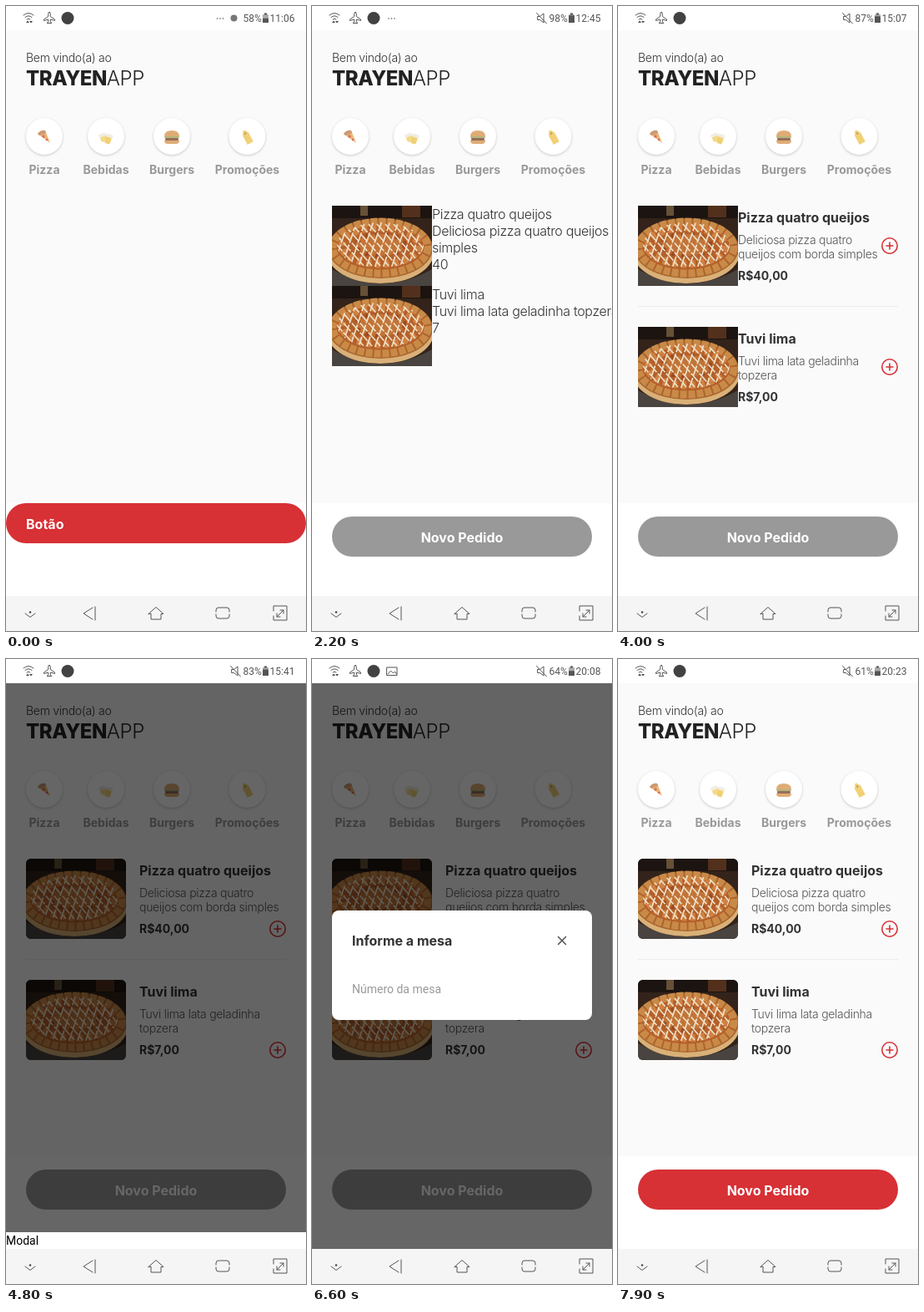
These frames come from a looping animation (360 by 748 pixels, 8000 ms). An HTML page:

```html
<!DOCTYPE html>
<html lang="pt-BR">
<head>
<meta charset="utf-8">
<title>Pedidos</title>
<style>
  html, body { margin: 0; width: 100%; height: 100%; overflow: hidden; background: #fff }
  svg { display: block; width: 100vw; height: 100vh }
  text { font-family: Inter, sans-serif; letter-spacing: -.02em; white-space: pre }
  text[font-weight="700"] { letter-spacing: 0 }
  .sys { font-family: Roboto, sans-serif; letter-spacing: 0 }
  .line { fill: none; stroke: #555; stroke-width: 1; stroke-linecap: round; stroke-linejoin: round }
  .disc { fill: #fff; filter: drop-shadow(0 1px 1.5px #0003) }
</style>
</head>
<body>
<svg id="stage" viewBox="0 0 360 748" preserveAspectRatio="none"></svg>
<script>
const LOOP = 8000, RED = '#d73035', GREY = '#999', INK = '#333';
const stage = document.getElementById('stage');

const rect = (x, y, w, h, fill, more = '') =>
  `<rect x="${x}" y="${y}" width="${w}" height="${h}" fill="${fill}" ${more}/>`;
const circle = (x, y, r, more) => `<circle cx="${x}" cy="${y}" r="${r}" ${more}/>`;
const line = (d, more = '') => `<path class="line" d="${d}" ${more}/>`;
const shape = (d, fill) => `<path d="${d}" fill="${fill}"/>`;
const text = (x, y, str, size = 14, weight = 300, fill = INK, more = '') =>
  `<text x="${x}" y="${y}" font-size="${size}" font-weight="${weight}" fill="${fill}" ${more}>${str}</text>`;
const sys = (x, y, str, size, fill) => text(x, y, str, size, 400, fill, 'class="sys"');
const MIDDLE = 'text-anchor="middle"';

// Each entry changes the screen from its time on.
const steps = [
  [0, { button: [0, 595, 360, 'Botão'], fill: RED, extra: '', mute: false, list: '', overlay: 0 }],
  [100, { centered: true }], [200, { footer: true, button: [0, 611, 360, 'Botão'] }],
  [300, { button: [24, 611, 312, 'Botão'] }], [500, { button: [24, 611, 312, 'Novo Pedido'] }], [600],
  [1000, { fill: GREY }], [1200, { list: 'names', left: 24, pitch: 20 }], [1300], [1500],
  [1600, { list: 'raw', pitch: 80 }], [1800, { mute: true }],
  [2000, { photo: true, left: 144, pitch: 96 }],
  [2100, { extra: 'dots' }], [2200], [2300], [2400], [2500, { list: 'styled' }], [2600],
  [2700, { pitch: 120 }], [2800, { extra: '' }], [2900], [3000, { pitch: 145 }],
  [3200], [3300, { rule: true }], [3400], [3500, { plus: 48 }], [3600], [3700], [3800], [4000],
  [4200, { rounded: true }], [4300, { left: 160 }], [4400, { plus: 84 }],
  [4600, { overlay: 657, modal: 'sheet' }], [4800],
  [5000, { overlay: 677, modal: 'text', height: 68 }], [5200], [5300],
  [5400, { modal: 'title', height: 74 }], [5600], [5800, { close: true }], [6000],
  [6200, { modal: 'field', height: 108 }], [6400, { extra: 'picture' }],
  [6600, { height: 131 }], [6800], [7000, { height: 155, border: true }],
  [7200, { height: 220, save: GREY }], [7400, { save: RED }], [7600],
  [7800, { overlay: 0, modal: '', fill: RED, extra: '' }], [7900],
];

// time, minute of the day, battery percentage
const gauges = [[0, 666, 58], [1000, 682, 56], [2200, 765, 98], [4000, 907, 87],
  [4800, 941, 83], [6600, 1208, 64], [7900, 1223, 61]];

function gauge(t, col) {
  const i = Math.max(1, gauges.findIndex(g => g[0] >= t));
  const a = gauges[i - 1], b = gauges[i];
  return Math.floor(a[col] + (b[col] - a[col]) * (t - a[0]) / (b[0] - a[0]) + 1e-6);
}

const products = [
  { name: 'Pizza quatro queijos', raw: ['Deliciosa pizza quatro queijos com borda', 'simples', '40'],
    info: ['Deliciosa pizza quatro', 'queijos com borda simples'], price: 'R$40,00' },
  { name: 'Tuvi lima', raw: ['Tuvi lima lata geladinha topzera', '7'],
    info: ['Tuvi lima lata geladinha', 'topzera'], price: 'R$7,00' },
];

function pizzaPhoto() {
  let sauce = '';
  for (let i = -2; i < 14; i++) sauce += `M${i * 10} 18l-22 66M${i * 10 - 16} 22l44 50`;
  const ellipse = (y, rx, ry, more) => `<ellipse cx="58" cy="${y}" rx="${rx}" ry="${ry}" ${more}/>`;
  return rect(0, 0, 120, 96, '#33231a') + rect(0, 0, 120, 15, '#1c1410') +
    rect(34, 0, 9, 12, '#665038') + rect(84, 0, 22, 14, '#53301c') +
    shape('M0 76q60 34 120 0v20H0z', '#4a4440') +
    ellipse(56, 64, 37, 'fill="#d9b078"') + ellipse(51, 63, 36, 'fill="#a9662e"') +
    ellipse(50, 57, 31, 'fill="#b4602a" stroke="#c98a48" stroke-width="9" stroke-dasharray="8 2"') +
    ellipse(48, 46, 22, 'fill="none" stroke="#cf8142" stroke-width="9" stroke-dasharray="6 5"') +
    ellipse(47, 29, 13, 'fill="#c27438" stroke="#9c4a22" stroke-width="5" stroke-dasharray="4 8"') +
    `<path clip-path="url(#topping)" d="${sauce}" fill="none" stroke="#efe0c6" stroke-width="1.7" stroke-dasharray="13 2"/>`;
}

const defs = `<defs>
  <clipPath id="topping"><ellipse cx="58" cy="47" rx="52" ry="27"/></clipPath>
  <clipPath id="square">${rect(0, 0, 120, 96, '#000')}</clipPath>
  <clipPath id="rounded">${rect(0, 0, 120, 96, '#000', 'rx="6"')}</clipPath>
  <g id="photo">${pizzaPhoto()}</g></defs>`;

const icons = [
  shape('M-8-4q4-5 9-4L7 7Z', '#e8b06a') + shape('M-8-4q4-5 9-4l1 3-8 3z', '#c98d62') +
    circle(-1, -1, 1.7, 'fill="#d4604a"') + circle(3, 3, 1.3, 'fill="#d4604a"'),
  '<g transform="rotate(-20)">' + rect(-7, -4, 8, 8, '#f3d57a', 'rx="2"') + rect(-8, -6, 9, 4, '#f1ece2', 'rx="2"') +
    '</g><g transform="rotate(20)">' + rect(0, -2, 7, 9, '#f0cd68', 'rx="2"') + rect(-1, -5, 9, 4, '#f1ece2', 'rx="2"') + '</g>',
  shape('M-9-1q0-7 9-7t9 7z', '#dca468') + rect(-9, -1, 18, 2, '#a9b070', 'rx="1"') +
    rect(-8, 1, 16, 3, '#8f5f48', 'rx="1"') + shape('M-9 4H9q0 4-4 4H-5q-4 0-4-4z', '#dca468'),
  '<g transform="rotate(-28)">' + shape('M-4-4L-1-9h2l3 5V8h-8z', '#f0cc68') + circle(0, -5, 1.2, 'fill="#b99050"') + '</g>',
];
const categories = [['Pizza', 46], ['Bebidas', 120], ['Burgers', 199], ['Promoções', 289.5]];

const header = text(24, 67, 'Bem vindo(a) ao') +
  text(24, 95, 'TRAYEN<tspan font-weight="300">APP</tspan>', 24, 800, '#222') +
  categories.map(([label, x], i) => circle(x, 156, 22, 'class="disc"') +
    `<g transform="translate(${x} 157)" opacity=".9">${icons[i]}</g>` +
    text(x, 200.5, label, 14, 700, GREY, MIDDLE)).join('');

const navBar = rect(0, 706, 360, 42, '#f5f5f5') +
  line('M23 727l6 4.5 6-4.5') + circle(29, 725.5, 1.3, 'fill="#484848"') +
  line('M107 719v16M104 720 93 727l11 7') +
  line('M171 727.5l9-8 9 8h-3v6.5h-12v-6.5z') +
  line('M252 725v-2q0-3 3-3h10q3 0 3 3v2M252 728v2q0 3 3 3h10q3 0 3-3v-2') +
  line('M321 724v-6h16v17h-16v-5M325 731l8-8m-4 0h4v4M325 727v4h4');

const dots = x => [-3.5, 0, 3.5].map(d => circle(x + d, 15, .8, 'fill="#555"')).join('');

function statusBar(s, t) {
  const now = gauge(t, 1), level = gauge(t, 2);
  const clock = Math.floor(now / 60) + ':' + String(now % 60).padStart(2, '0');
  const fill = 9 * level / 100;
  return rect(0, 0, 360, 29, '#fff') +
    line('M21 11q6-5 12 0M23 13.5q4-3.5 8 0M25 16q2-2 4 0') +
    shape('M24 20l2-2.5 2 2.5zM28 18h4l-2 2.5z', '#484848') +
    line('M52 7.5q1.3 0 1.3 2v3l5.2 3.5v1.5l-5.2-1.5v3l1.7 1.5h-6l1.7-1.5v-3l-5.2 1.5V16l5.2-3.5v-3q0-2 1.3-2z') +
    circle(74, 14.5, 7.5, 'fill="#424242"') +
    (s.extra === 'dots' ? dots(95.5) : '') +
    (s.extra === 'picture' ? line('M90 10h12v9.5H90zM91 18l3.5-4 3 3 2-2 2 3') : '') +
    (s.mute ? line('M271 12.500h2.500l4.500-3.500v11l-4.500-3.500H271zM269.500 8.500l12 12.500')
            : dots(257) + circle(273.5, 14.5, 4, 'fill="#777"')) +
    sys(284.5, 19, level + '%', 12, '#555') + sys(316.5, 19, clock, 12, '#555') +
    rect(308, 10, 7, 10, '#aaa', 'rx="1"') + rect(310, 8.5, 3, 2, '#555') +
    rect(308, 20 - fill, 7, fill, '#555', 'rx=".6"');
}

function product(p, y, s) {
  let out = '';
  if (s.photo) out += `<g transform="translate(24 ${y})" clip-path="url(#${s.rounded ? 'rounded' : 'square'})">
    <use href="#photo"/></g>`;
  if (s.list !== 'styled') {
    const rows = s.list === 'names' ? [p.name] : [p.name, ...p.raw];
    return out + rows.map((row, i) => text(s.left, y + 16 + 20 * i, row, 16)).join('');
  }
  out += text(s.left, y + 20, p.name, 16, 700) +
    p.info.map((row, i) => text(s.left, y + 46 + 17.3 * i, row, 14, 300, '#555')).join('') +
    text(s.left, y + 89, p.price, 14, 700);
  if (s.plus) {
    const cy = y + s.plus;
    out += circle(326, cy, 9.2, `fill="none" stroke="${RED}" stroke-width="1.6"`) +
      line(`M322 ${cy}h8M326 ${cy - 4}v8`, `style="stroke:${RED};stroke-width:1.6"`);
  }
  return out;
}

function button([x, y, w, label], fill, centered) {
  return rect(x, y, w, 48, fill, 'rx="24"') + (centered
    ? text(x + w / 2, y + 30.5, label, 16, 700, '#fff', MIDDLE)
    : text(x + 24, y + 30.5, label, 16, 700, '#fff'));
}

function modal(s) {
  if (s.modal === 'sheet') return rect(0, 686, 360, 20, '#fff') + sys(0, 701, 'Modal', 14, '#000');
  const top = 366.5 - s.height / 2, bottom = top + s.height;
  let out = rect(24, top, 312, s.height, '#fff', 'rx="8"');
  if (s.modal === 'text') return out + sys(48, 371, 'Modal', 14, '#000');
  out += text(48, top + 42, 'Informe a mesa', 16, 700);
  if (s.close) out += line(`M295.5 ${top + 31.5}l9 9m0-9l-9 9`, 'style="stroke-width:1.6"');
  if (s.modal !== 'field') return out;
  const y = bottom - 37 - (s.save ? 72 : 0);
  if (s.border) out += rect(48, y - 26, 264, 52, '#fff', 'rx="8" stroke="#ccc"');
  out += sys(s.border ? 64 : 48, y + 5, 'Número da mesa', 14, GREY);
  return out + (s.save ? button([48, bottom - 72, 264, 'Salvar'], s.save, true) : '');
}

function draw(s, t) {
  stage.innerHTML = defs + rect(0, 29, 360, 566, '#fafafa') + header +
    (s.list ? products.map((p, i) => product(p, 239 + s.pitch * i, s)).join('') : '') +
    (s.rule ? rect(24, 359, 312, 1, '#ececec') : '') +
    (s.footer ? rect(0, 595, 360, 111, '#fff') : '') +
    button(s.button, s.fill, s.centered) +
    (s.overlay ? rect(0, 29, 360, s.overlay, '#000', 'opacity=".6"') : '') +
    (s.modal ? modal(s) : '') + navBar + statusBar(s, t);
}

let shown = -1;
function tick() {
  const t = performance.now() % LOOP;
  const index = steps.findLastIndex(step => step[0] <= t);
  if (index !== shown) {
    shown = index;
    const state = Object.assign({}, ...steps.slice(0, index + 1).map(step => step[1]));
    draw(state, steps[index][0]);
  }
  requestAnimationFrame(tick);
}
tick();
</script>
</body>
</html>
```
